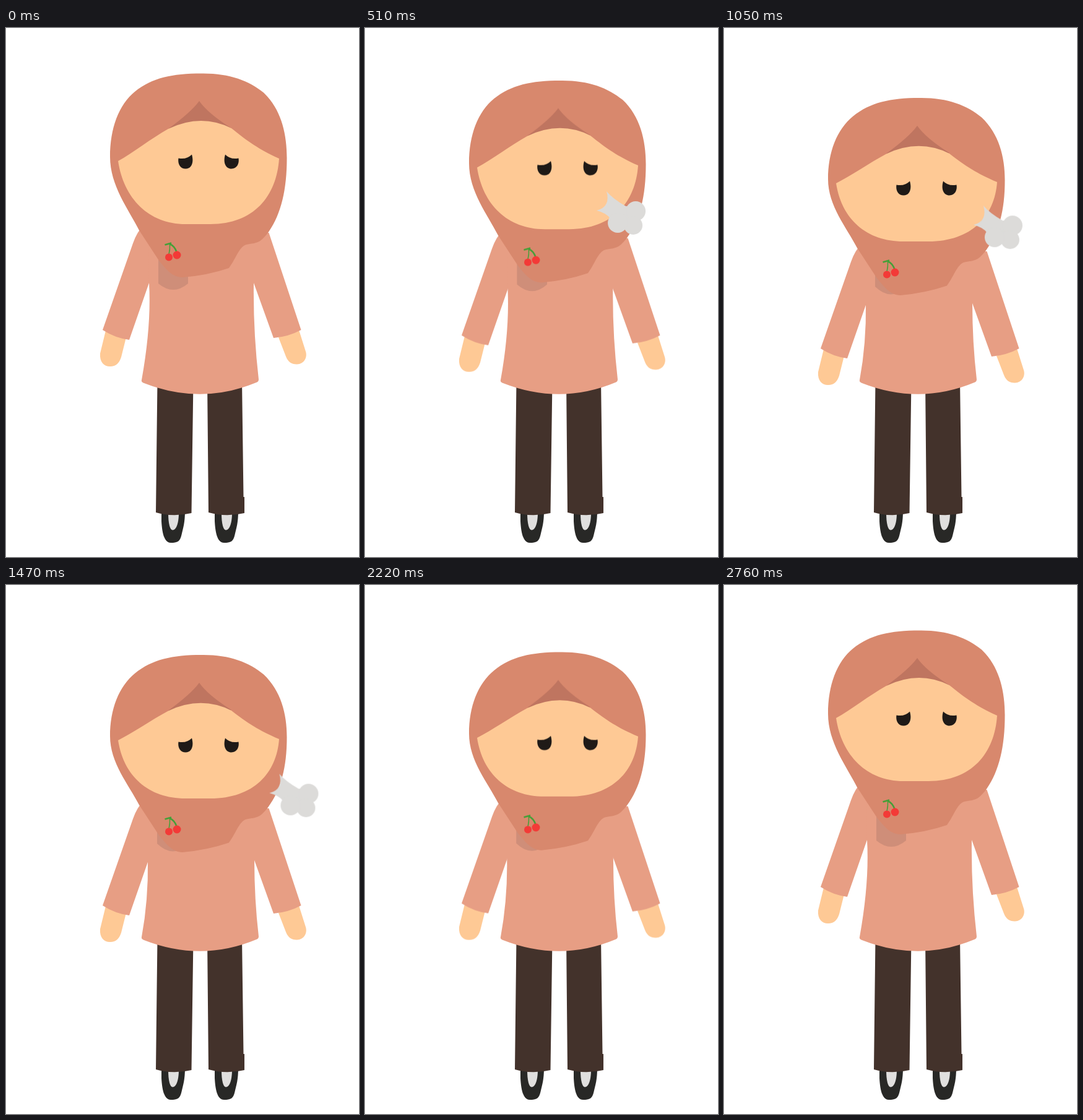
Animation of 570 by 855 pixels, one loop 3 s. Source, as an HTML page without scripts:

```html
<!DOCTYPE html>
<html lang="en">
<head>
<meta charset="utf-8">
<title>Sigh</title>
<style>
html, body { margin: 0; height: 100%; overflow: hidden; background: #fff; }
svg { display: block; width: 100%; height: 100%; }

.sink, .torso, .pocket, .hood, .face {
  animation: sink 3s cubic-bezier(.37, 0, .63, 1) infinite;
}
.torso { animation-name: torso; }
.pocket { animation-name: pocket; }
.hood { animation-name: hood; }
.face { animation-name: face; }
.arms { --drop: 30px; }
.brow { --drop: 40px; }
.cherry { --drop: 28px; }
.eyes { --drop: 43px; animation-delay: 20ms; }
.puff { animation: drift 3s linear infinite, show 3s step-end infinite; }

@keyframes sink {
  0%, 9.4%, 90.5%, 100% { transform: translateY(0); }
  30.4%, 69.4% { transform: translateY(var(--drop)); }
}
@keyframes torso {
  0%, 9.4%, 90.5%, 100% { d: path("M230 330L231 412Q235 480 219 569Q218 572 223 574Q315 610 404 573Q408 572 408 568Q399 490 400 412L400 330Z"); }
  30.4%, 69.4% { d: path("M230 360L229 444Q230 510 219 569Q218 572 223 574Q315 610 404 573Q408 572 408 568Q401 508 401 444L400 360Z"); }
}
@keyframes pocket {
  0%, 9.4%, 90.5%, 100% { d: path("M246 370L294 370L294 413Q270 433 246 413Z"); }
  30.4%, 69.4% { d: path("M244 395L294 395L294 418Q270 443 244 418Z"); }
}
@keyframes hood {
  0%, 9.4%, 90.5%, 100% { d: path("M316 73.5C360 73 392 85 416 104.5C444 131 453.5 170 453.5 210C453.5 262 444 302 423 331C411 346 408 347 391 349.5C377 351 373 370 360 388Q325 400 285 403C268 403 258 389 247 376L215 327C198 293 168 255 168 208C168 162 182 124 208.500 102.500C236 80.500 268 73.500 316 73.5Z"); }
  30.4%, 69.4% { d: path("M316 113C360 112.5 392 124.5 416 144.5C444 171 453.5 208 453.5 246C453.5 295 444 331 423 359.5C411 374.5 408 375.5 391 378C377 379.5 373 398.5 360 416.5Q325 428.5 285 432C268 432 258 417 247 404.5L215 355.5C198 322 168 288 168 244C168 201 182 164 208.500 142.500C236 120.500 268 113 316 113Z"); }
}
@keyframes face {
  0%, 9.4%, 90.5%, 100% { d: path("M181 215C205 202 235 178 262 163Q315 137.5 364 162C390 183 408 196 441 211C437 272 400 317 330 317L290 317C230 317 190 275 181 215Z"); }
  30.4%, 69.4% { d: path("M181 251C205 239 235 218 262 203.5Q315 178.5 364 203C390 223 408 235 441 249C437 304 400 345 330 345L290 345C230 345 190 309 181 251Z"); }
}
@keyframes drift {
  from { transform: translate(-27.3px, -22px); }
  to { transform: translate(133.2px, 107px); }
}
@keyframes show {
  0%, 58% { opacity: 0; }
  10% { opacity: 1; }
}
</style>
</head>
<body>
<svg viewBox="0 0 570 855">
  <g id="shoe">
    <path fill="#282826" d="M251 780V797C252 815 255 832 266 832C277 832 281 830 283.500 819C286 808 289 800 289 780Z"/>
    <path fill="#e0dfde" d="M262 784C262 802 265 811.500 269 811.500C275 811.500 279 800 279 784Z"/>
  </g>
  <use href="#shoe" x="86"/>
  <path fill="#43322b" d="M244.500 570L242 783Q270 791 299.500 784L302.500 570ZM325 570L327 783Q355 791 385 784V758H383.500L381 570Z"/>

  <g class="sink arms">
    <path fill="#fec995" d="M162 485L152 526C151 540 158 547 168 547C178 547 183 541 186 532L194 500ZM440 500L452 531Q457 544 470 543.500C481 543 487 533 484 523L472 485Z"/>
    <path fill="#e79e84" d="M222 320Q212 328 205 348L156 488Q176 501 199 504L231 412L260 330ZM380 330L400 412L432 501Q456 499 476.500 488L424.500 331Z"/>
  </g>
  <path class="torso" fill="#e79e84"/>
  <path class="pocket" fill="#cf8e79"/>

  <path class="hood" fill="#d8886d"/>
  <path class="sink brow" fill="#bf7560" d="M312 118Q299 136 262 163L364 162Q326 138 312 118Z"/>
  <path class="face" fill="#fec995"/>
  <g class="sink eyes" fill="#1f1a17">
    <path id="eye" d="M278.500 210.500Q292 213 300 204.500C304 218 299 227.500 290 227.500C281 227.500 277 219 278.500 210.500Z"/>
    <use href="#eye" transform="matrix(-1 0 0 1 654 0)"/>
  </g>

  <g class="sink cherry">
    <g fill="none" stroke="#44a038">
      <path stroke-width="2.500" d="M256.500 350.500L267 347.500M264 349Q272 352 275.500 362"/>
      <path stroke-width="1.500" d="M264.500 348Q265 358 263 366"/>
    </g>
    <g fill="#f33a37">
      <circle cx="263" cy="370.500" r="6"/>
      <circle cx="276" cy="367" r="6.500"/>
    </g>
  </g>

  <g class="puff" fill="#dcdbd9">
    <path d="M390 264Q397 289 374 295Q390 299 396 308L424 316L428 288L421 288Q400 276 390 264Z"/>
    <circle cx="437" cy="296" r="16"/>
    <circle cx="433" cy="319" r="15"/>
    <circle cx="408" cy="315" r="16"/>
  </g>
</svg>
</body>
</html>
```
